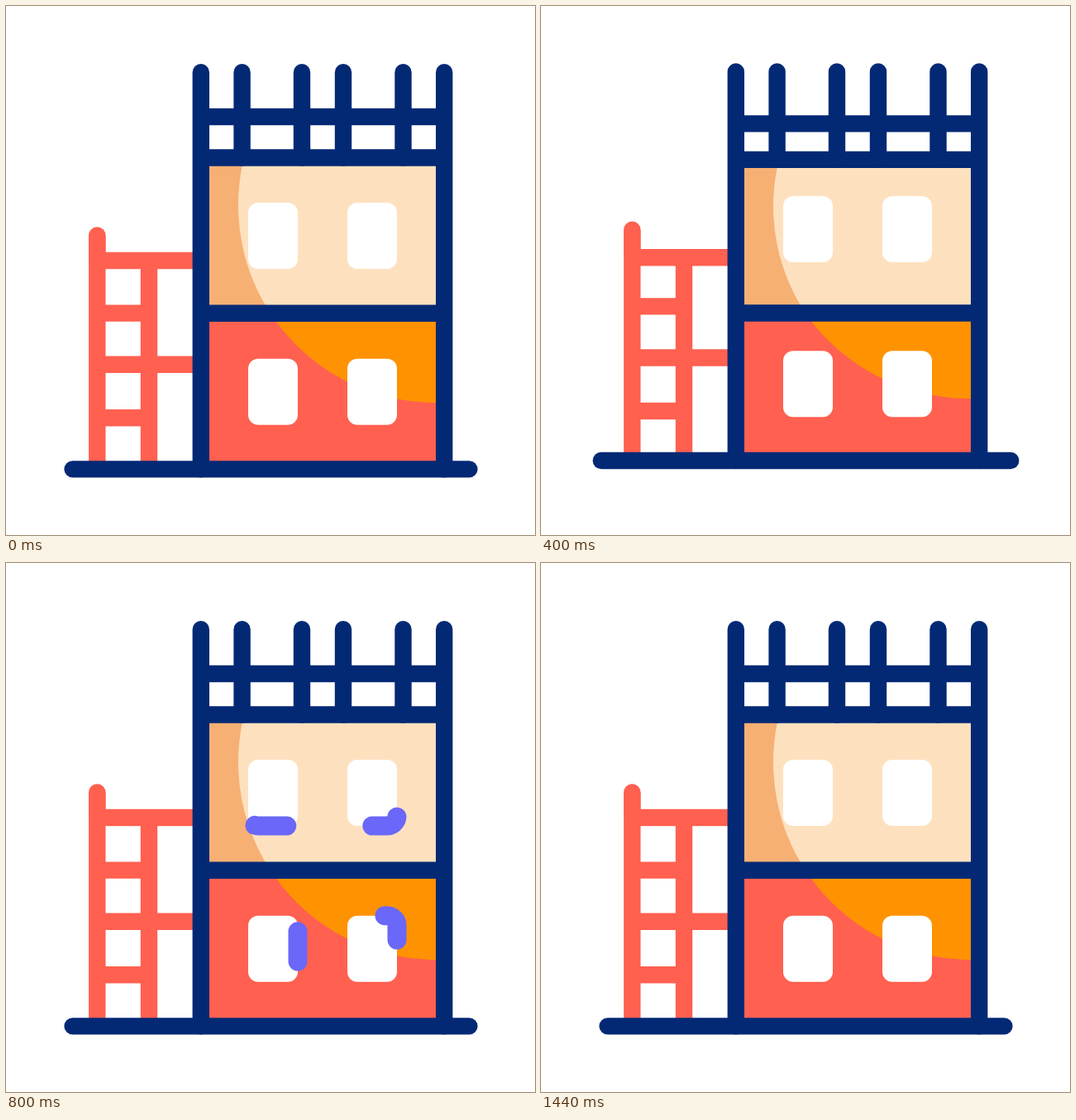
An HTML page for the animation above (1.48 s loop, 640 by 640 pixels).

```html
<!DOCTYPE html>
<html lang="en">
<head>
<meta charset="utf-8">
<title>Building under construction</title>
<style>
  html, body { margin: 0; width: 100%; height: 100%; overflow: hidden; background: #fff; }
  svg { display: block; width: 100vw; height: 100vh; }
  .beam { fill: none; stroke-width: 20.4; }
  .navy { stroke: #032975; }
  .red { stroke: #ff6050; }
  .round { stroke-linecap: round; }
  .trace { fill: none; stroke: #6b67f8; stroke-width: 23; stroke-linecap: round; stroke-linejoin: round; }
</style>
</head>
<body>
<svg viewBox="0 0 640 640">
  <defs>
    <clipPath id="upperClip"><rect x="236" y="183.5" width="294" height="188.2"/></clipPath>
    <clipPath id="lowerClip"><rect x="236" y="371.7" width="294" height="188"/></clipPath>
  </defs>
  <path id="rails" class="beam red"/>
  <path id="railTop" class="beam red round"/>
  <path id="rungs" class="beam red"/>
  <rect id="lowerWall" x="236" width="294" fill="#ff6050"/>
  <g id="lower" clip-path="url(#lowerClip)">
    <circle cx="520" cy="241" r="239" fill="#ff9200"/>
  </g>
  <g id="upper" clip-path="url(#upperClip)">
    <rect x="236" y="183" width="294" height="190" fill="#f6b074"/>
    <circle cx="520" cy="241" r="239" fill="#fde1bf"/>
  </g>
  <g id="windows"></g>
  <path id="floors" class="beam navy"/>
  <path id="rods" class="beam navy round"/>
  <path id="ground" class="beam navy round"/>
</svg>
<script>
const LOOP = 1480, STEP = 40;
const W = 60, H = 80, R = 12;
const PERIMETER = 2 * (W + H - 4 * R) + 2 * Math.PI * R;
const TRACE_START = 680, TRACE_END = 1440;

const $ = id => document.getElementById(id);
const setPath = (id, d) => $(id).setAttribute('d', d);

function ease(t, from, to) {
  const u = Math.min(1, Math.max(0, (t - from) / (to - from)));
  return u * u * (3 - 2 * u);
}

// Rest, leap, squash, rest: 200 ms per leg.
function bounce(t, leap, squash) {
  return leap * ease(t, 80, 280) + (squash - leap) * ease(t, 280, 480) - squash * ease(t, 480, 680);
}

function roundRect(x, y) {
  const arc = (dx, dy) => `a${R} ${R} 0 0 1 ${dx} ${dy}`;
  const w = W - 2 * R, h = H - 2 * R;
  return `M${x + R} ${y}h${w}${arc(R, R)}v${h}${arc(-R, R)}h${-w}${arc(-R, -R)}v${-h}${arc(R, -R)}z`;
}

// from: where the outline begins along the frame; draw: time to close it
const panes = [
  { x: 293, y: 238, leap: -58, squash: 19, from: 130.7, draw: 491 },
  { x: 413, y: 238, leap: -58, squash: 19, from: 111.9, draw: 515 },
  { x: 293, y: 426.7, leap: -61.8, squash: 19, from: 61.9, draw: 511 },
  { x: 413, y: 426.7, leap: -61.8, squash: 19, from: 33, draw: 490 }
];

function addPath(parent, attrs) {
  const el = document.createElementNS('http://www.w3.org/2000/svg', 'path');
  for (const key in attrs) el.setAttribute(key, attrs[key]);
  parent.appendChild(el);
  return el;
}

for (const p of panes) {
  const d = roundRect(p.x, p.y);
  p.glass = addPath($('windows'), { d, fill: '#fff' });
  p.trace = addPath($('windows'), { d, class: 'trace' });
}

// Vertical stretch that carries y1 to z1 and y2 to z2.
function stretch(id, y1, z1, y2, z2) {
  const k = (z2 - z1) / (y2 - y1);
  $(id).setAttribute('transform', `matrix(1 0 0 ${k} 0 ${z1 - k * y1})`);
}

const hline = (x1, x2, y) => `M${x1} ${y}H${x2}`;
const vline = (x, y1, y2) => `M${x} ${y1}V${y2}`;

function drawTrace(p, t) {
  const closed = TRACE_START + p.draw;
  const head = ease(t, TRACE_START, closed);
  const tail = ease(t, closed, TRACE_END);
  const len = (head - tail) * PERIMETER;
  p.trace.style.display = len > 0.01 ? '' : 'none';
  p.trace.setAttribute('stroke-dasharray', `${len} ${PERIMETER - len}`);
  p.trace.setAttribute('stroke-dashoffset', -(p.from + tail * PERIMETER));
}

function render(t) {
  const at = (y, leap, squash) => y + bounce(t, leap, squash);
  const base = at(560.4, -30, 0.2);
  const top = at(80.3, -54, 28);
  const cage = at(134, -55.5, 43);
  const roof = at(183.5, -44.8, 28);
  const mid = at(371.7, -44, 23.5);
  const spread = bounce(t, -9.5, 17.3);

  setPath('ground', hline(80.6 - spread, 560.4 + spread, base));
  setPath('floors', [cage, roof, mid].map(y => hline(236, 530, y)).join(''));
  setPath('rods',
    [235.8, 530.2].map(x => vline(x, top, base)).join('') +
    [285.6, 358, 408, 480.5].map(x => vline(x, top, roof)).join(''));

  const railTop = at(277.5, -54.8, 19.3);
  const rung = at(308, -45.5, 19);
  setPath('railTop', vline(110.3, railTop, railTop + 30));
  setPath('rails', vline(110.3, railTop, base) + vline(173, rung, base));
  setPath('rungs', hline(110, 236, rung) + [371.6, 433.8, 498.2].map((y, i) =>
    hline(110, i === 1 ? 236 : 173, at(y, -61.3, 20.6))).join(''));

  $('lowerWall').setAttribute('y', mid);
  $('lowerWall').setAttribute('height', base - mid);
  stretch('upper', 183.5, roof, 371.7, mid);
  stretch('lower', 371.7, mid, 480, at(480, -30, 8.7));

  for (const p of panes) {
    p.glass.setAttribute('transform', `translate(0 ${bounce(t, p.leap, p.squash)})`);
    drawTrace(p, t);
  }
}

const begin = performance.now();
function tick() {
  const t = (performance.now() - begin) % LOOP;
  render(Math.floor(t / STEP) * STEP);
  requestAnimationFrame(tick);
}
tick();
</script>
</body>
</html>
```
